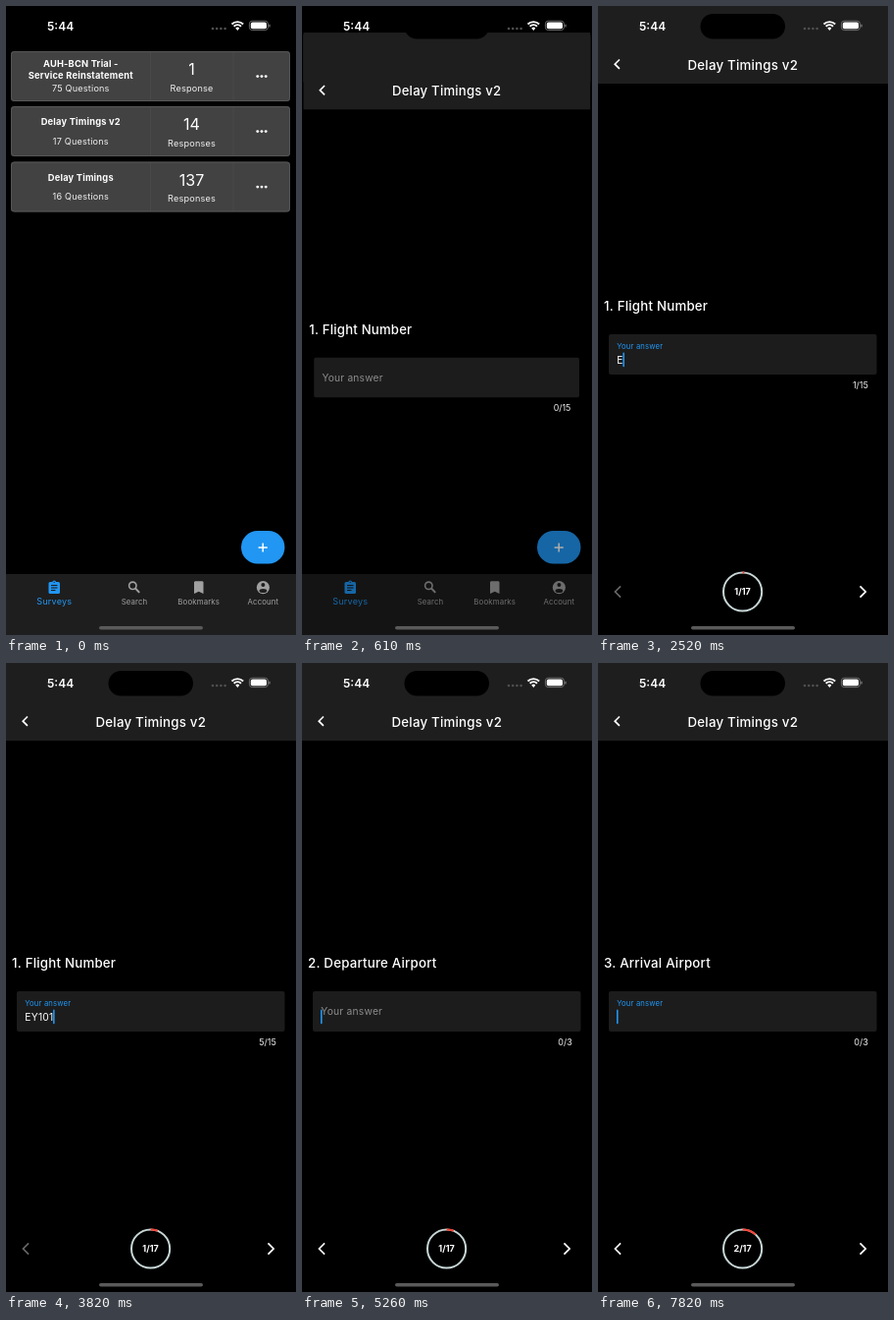
Recreate the animation shown at these times as an HTML page with a canvas. Size 296 px wide and 640 px high, loop 8 s.

```html
<!DOCTYPE html>
<html lang="en">
<head>
<meta charset="utf-8">
<title>Survey app</title>
<style>
html, body { margin: 0; width: 100%; height: 100%; overflow: hidden; background: #000; }
canvas { display: block; width: 296px; height: 640px; }
</style>
</head>
<body>
<canvas id="stage"></canvas>
<script>
const W = 296, H = 640, LOOP = 8000;
const BLUE = '#2196f3', BAR = '#1e1e1e', ICON = '#a0a0a0';
const canvas = document.getElementById('stage');
const ctx = canvas.getContext('2d');
const dpr = window.devicePixelRatio || 1;
canvas.width = W * dpr;
canvas.height = H * dpr;

const clamp = v => Math.max(0, Math.min(1, v));
const mix = (a, b, p) => a + (b - a) * p;
const grey = v => `rgb(${v},${v},${v})`;

// Last value whose time has been reached
function at(t, first, keys) {
  let v = first;
  for (const [time, value] of keys) if (t >= time) v = value;
  return v;
}

// Whole screen refreshes since t0
const ticks = (t, t0) => Math.floor((t - t0) / 106);
const ramp = (t, t0, n) => clamp((ticks(t, t0) + 1) / n);

// cubic-bezier(.4, 0, .2, 1)
function fastOutSlowIn(x) {
  let lo = 0, hi = 1;
  for (let i = 0; i < 24; i++) {
    const s = (lo + hi) / 2, r = 1 - s;
    if (1.2 * r * r * s + 0.6 * r * s * s + s * s * s < x) lo = s; else hi = s;
  }
  return lo * lo * (3 - 2 * lo);
}

function text(str, x, cy, size, { color = '#fff', weight = 400, align = 'left', gap = 0.2 } = {}) {
  ctx.font = `${weight} ${size}px Inter, "Liberation Sans", sans-serif`;
  ctx.letterSpacing = gap + 'px';
  ctx.textAlign = align;
  ctx.fillStyle = color;
  ctx.fillText(str, x, cy + size * 0.364);
}

function box(x, y, w, h, r, color) {
  ctx.beginPath();
  ctx.roundRect(x, y, w, h, r);
  ctx.fillStyle = color;
  ctx.fill();
}

function dot(x, y, r, color) {
  ctx.beginPath();
  ctx.arc(x, y, r, 0, Math.PI * 2);
  ctx.fillStyle = color;
  ctx.fill();
}

function arc(x, y, r, a, b, width, color) {
  ctx.beginPath();
  ctx.arc(x, y, r, a, b);
  ctx.lineWidth = width;
  ctx.strokeStyle = color;
  ctx.stroke();
}

function line(points, width, color) {
  ctx.beginPath();
  points.forEach(([x, y]) => ctx.lineTo(x, y));
  ctx.lineWidth = width;
  ctx.strokeStyle = color;
  ctx.stroke();
}

function chevron(x, y, dir, size, color) {
  const a = dir * size / 2;
  line([[x - a, y - size], [x + a, y], [x - a, y + size]], 1.7, color);
}

const cards = [
  { y: 46, name: ['AUH-BCN Trial -', 'Service Reinstatement'], questions: 75, replies: 1 },
  { y: 102, name: ['Delay Timings v2'], questions: 17, replies: 14 },
  { y: 158.5, name: ['Delay Timings'], questions: 16, replies: 137 }
];

// Drawn relative to the card's own corner
function card({ name, questions, replies }) {
  const mid = { align: 'center' };
  box(0, 0, 285, 51, 3, '#424242');
  ctx.beginPath();
  ctx.roundRect(0.5, 0.5, 284, 50, 3);
  ctx.lineWidth = 0.8;
  ctx.strokeStyle = '#5c5c5c';
  ctx.stroke();
  for (const x of [142.5, 227]) line([[x, 1], [x, 50]], 0.8, 'rgba(255,255,255,.05)');
  const two = name.length > 1;
  name.forEach((s, i) => text(s, 71.3, (two ? 12.5 : 16) + i * 12, 9.3, { weight: 700, align: 'center' }));
  text(questions + ' Questions', 71.3, two ? 38 : 35.2, 9.1, { align: 'center', color: '#f0f0f0' });
  text(replies, 184.5, 18.5, 16, { ...mid, gap: 0 });
  text(replies > 1 ? 'Responses' : 'Response', 184.5, 37.2, 9.1, { align: 'center', color: '#f0f0f0' });
  for (const x of [251.8, 256, 260.2]) dot(x, 25.6, 1.45, '#fff');
}

function navIcons() {
  // clipboard
  box(43.5, 586, 11.5, 12, 1.5, BLUE);
  dot(49.2, 586.3, 1.9, BLUE);
  dot(49.2, 586.4, 0.6, BAR);
  [[589.5, 52.5], [592, 52.5], [594.5, 50.5]].forEach(([y, x]) => line([[46, y], [x, y]], 1.1, BAR));
  // magnifier
  arc(129.3, 589.8, 3.7, 0, 7, 1.6, ICON);
  line([[132, 592.5], [136.2, 596.9]], 1.9, ICON);
  // bookmark
  ctx.beginPath();
  [[192, 586], [193, 585.2], [200.5, 585.2], [201.5, 586], [201.5, 598], [196.75, 595.8], [192, 598]]
    .forEach(p => ctx.lineTo(...p));
  ctx.fillStyle = ICON;
  ctx.fill();
  // person
  dot(262.4, 591.6, 6.6, ICON);
  dot(262.4, 589, 2, BAR);
  ctx.beginPath();
  ctx.ellipse(262.4, 595, 3.9, 2, 0, 0, Math.PI * 2);
  ctx.fill();
}

function home(hidden) {
  cards.forEach((c, i) => {
    if (i === hidden) return;
    ctx.save();
    ctx.translate(5, c.y);
    card(c);
    ctx.restore();
  });
  box(240, 534, 44.5, 33.5, 16.7, BLUE);
  line([[257.6, 551], [266.8, 551]], 1.5, '#fff');
  line([[262.2, 546.4], [262.2, 555.6]], 1.5, '#fff');
  ctx.fillStyle = BAR;
  ctx.fillRect(0, 578, W, 62);
  navIcons();
  text('Surveys', 49.3, 605.5, 9.1, { color: BLUE, align: 'center' });
  [['Search', 131], ['Bookmarks', 196.7], ['Account', 262.4]].forEach(([s, x]) =>
    text(s, x, 606.3, 7.85, { color: ICON, align: 'center', gap: 0.12 }));
}

const pages = [
  {
    title: '1. Flight Number', max: 15, focus: 1950, caret: 1950,
    typed: [[2520, 'E'], [2740, 'EY'], [3280, 'EY1'], [3710, 'EY10'], [3820, 'EY101']],
    blink: [[4370, 0.5], [4480, 0], [4700, 0.5], [4820, 1]]
  },
  {
    title: '2. Departure Airport', max: 3, focus: 5380, caret: 5260,
    typed: [[5710, 'A'], [5930, 'AU'], [6270, 'AUH']],
    blink: [[6810, 0.5], [6920, 0], [7150, 0.5], [7260, 1]]
  },
  { title: '3. Arrival Airport', max: 3, focus: 7710, caret: 7600, typed: [], blink: [] }
];

function question(p, t) {
  const value = at(t, '', p.typed);
  const up = ramp(t, p.focus, 2);
  text(p.title, 6, 305.5, 13.3, { weight: 500 });
  box(11, 334, 273.5, 41, 2, '#1c1c1c');
  const tint = `rgb(${mix(140, 33, up)},${mix(140, 150, up)},${mix(140, 243, up)})`;
  text('Your answer', 19.3, mix(354.3, 346.3, up), mix(10.3, 7.7, up), { color: tint, gap: mix(0.2, 0.15, up) });
  text(value, 19.3, 360.2, 10.3);
  if (t >= p.caret) {
    const x = 19.3 + (value ? ctx.measureText(value).width : 0);
    ctx.globalAlpha = at(t, 1, p.blink);
    box(x - 0.3, 352.6, 1.6, 14.6, 0.8, BLUE);
    ctx.globalAlpha = 1;
  }
  text(`${value.length}/${p.max}`, 275.8, 385.7, 9, { align: 'right', color: '#f0f0f0', gap: 0 });
}

function survey(t) {
  ctx.fillStyle = '#000';
  ctx.fillRect(0, 0, W, H);
  ctx.fillStyle = BAR;
  ctx.fillRect(0, 0, W, 79);
  chevron(19.6, 59.2, -1, 4.7, '#fff');
  text('Delay Timings v2', 147.8, 60, 13.3, { weight: 500, align: 'center' });

  const scroll = at(t, 0, [[5040, 0.35], [5150, 0.9], [5260, 1], [7490, 1.5], [7600, 2]]);
  pages.forEach((p, i) => {
    if (Math.abs(i - scroll) >= 1) return;
    ctx.save();
    ctx.translate((i - scroll) * W, 0);
    question(p, t);
    ctx.restore();
  });

  const done = ramp(t, 2520, 4) + ramp(t, 5710, 4);
  const top = -Math.PI / 2;
  arc(147.6, 596, 19.6, 0, 7, 2, '#c8d6d6');
  if (done) arc(147.6, 596, 19.6, top, top + done / 17 * Math.PI * 2, 2, '#f44336');
  text(`${Math.ceil(done)}/17`, 147.6, 596.2, 9, { weight: 700, align: 'center', gap: 0 });

  const ripple = at(t, 0, [[5040, 0.12], [5150, 0.06], [5260, 0], [7490, 0.12], [7600, 0.05], [7710, 0]]);
  if (ripple) dot(270, 596, 24, `rgba(255,255,255,${ripple})`);
  chevron(20.3, 596, -1, 5.6, t < 5150 ? '#666' : '#fff');
  chevron(270.3, 596, 1, 5.6, '#fff');
}

// The tapped card grows into the survey screen
function opening(t) {
  const lin = clamp(0.248 + 0.222 * ticks(t, 500));
  const p = fastOutSlowIn(lin);
  const x = mix(5, 0, p), y = mix(102, 0, p), w = mix(285, W, p), h = mix(51, H, p);
  home(1);
  ctx.fillStyle = 'rgba(0,0,0,.32)';
  ctx.fillRect(0, 0, W, H);
  ctx.save();
  ctx.beginPath();
  ctx.roundRect(x, y, w, h, mix(3, 0, p));
  ctx.clip();
  const shown = clamp((lin - 0.2) / 0.2);
  ctx.fillStyle = grey(mix(66, 0, shown));
  ctx.fillRect(x, y, w, h);
  ctx.translate(x, y);
  ctx.save();
  ctx.scale(w / 285, w / 285);
  card(cards[1]);
  ctx.restore();
  ctx.scale(w / W, w / W);
  if (shown < 1) {
    ctx.fillStyle = `rgba(0,0,0,${shown})`;
    ctx.fillRect(0, 0, W, H);
    ctx.fillStyle = `rgba(30,30,30,${shown})`;
    ctx.fillRect(0, 0, W, 79);
    text('Delay Timings v2', 147.8, 60, 13.3, { weight: 500, align: 'center', color: `rgba(255,255,255,${shown})` });
  } else survey(t);
  ctx.restore();
}

function statusBar() {
  box(104.5, 8, 86.5, 25.5, 12.75, '#000');
  text('5:44', 42, 20.2, 12, { weight: 600, gap: 0 });
  for (let i = 0; i < 4; i++) dot(211 + i * 4.2, 23, 1.3, '#505050');
  const up = -Math.PI / 2;
  for (const r of [8.3, 5.2]) arc(236.3, 24.4, r, up - 0.78, up + 0.78, 1.9, '#fff');
  ctx.beginPath();
  ctx.moveTo(236.3, 25);
  ctx.arc(236.3, 24.6, 2.9, up - 0.78, up + 0.78);
  ctx.fillStyle = '#fff';
  ctx.fill();
  ctx.beginPath();
  ctx.roundRect(248.4, 15.2, 19, 9.4, 3);
  ctx.lineWidth = 0.8;
  ctx.strokeStyle = '#808080';
  ctx.stroke();
  box(249.8, 16.6, 16.2, 6.6, 1.8, '#fff');
  box(268.4, 18.4, 1.2, 3.2, 0.6, '#808080');
  box(95, 631, 106, 3.6, 1.8, '#5a5a5a');
}

function draw(t) {
  ctx.setTransform(dpr, 0, 0, dpr, 0, 0);
  ctx.fillStyle = '#000';
  ctx.fillRect(0, 0, W, H);
  if (t < 500) home();
  else if (t < 940) opening(t);
  else survey(t);
  statusBar();
}

const start = performance.now();
function loop() {
  draw((performance.now() - start) % LOOP);
  requestAnimationFrame(loop);
}
loop();
</script>
</body>
</html>
```
